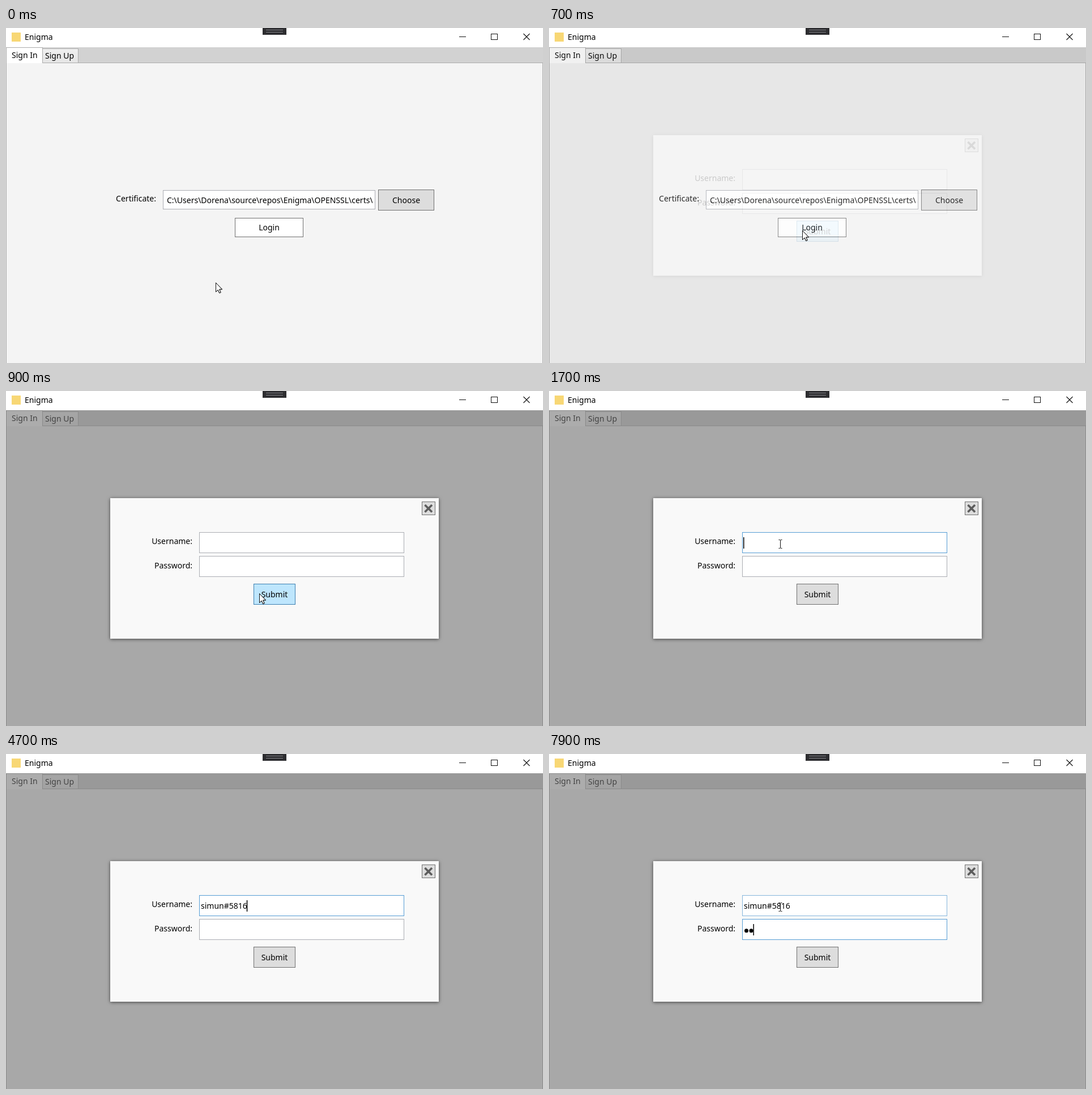
An HTML page with a canvas for the animation above (8 s loop, 948 by 591 pixels).

```html
<!DOCTYPE html>
<html lang="en">
<head>
<meta charset="utf-8">
<title>Enigma</title>
<style>
  html, body { margin: 0; width: 100%; height: 100%; overflow: hidden; background: #fff; }
  canvas { display: block; width: 948px; height: 591px; }
</style>
</head>
<body>
<canvas id="stage" width="948" height="591"></canvas>
<script>
const W = 948, H = 591, LOOP = 8000, STEP = 100;
const TITLE_BAR = 34;
const stage = document.getElementById('stage').getContext('2d');
const layer = Object.assign(document.createElement('canvas'), { width: W, height: H }).getContext('2d');

const GREY = '#abadb3', FOCUS = '#569dd5', HOVER = '#86b6dc';
const BUTTON = { fill: '#dddddd', line: '#707070' };
const BUTTON_HOVER = { fill: '#bee6fd', line: '#3c7fb1' };
const CERT_PATH = 'C:\\Users\\Dorena\\source\\repos\\Enigma\\OPENSSL\\certs\\client.crt';
const USER = 'simun#5816';
const USER_KEYS = [1900, 2200, 2500, 2900, 2900, 3000, 4100, 4500, 4600, 4700];
const DOT_KEYS = [7200, 7600];
const USER_FOCUS = 1600, PASS_FOCUS = 5400, BLINK = 530;

const clamp01 = v => Math.max(0, Math.min(1, v));
const progress = (t, a, b) => clamp01((t - a) / (b - a));
const ease = p => p * p * (3 - 2 * p);
const mix = (a, b, p) => a + (b - a) * p;
const typed = (keys, t) => keys.filter(k => k <= t).length;

function box(c, x, y, w, h, fill, line) {
  c.fillStyle = fill;
  c.fillRect(x, y, w, h);
  if (!line) return;
  c.strokeStyle = line;
  c.lineWidth = 1;
  c.strokeRect(x + .5, y + .5, w - 1, h - 1);
}

function text(c, str, x, y, size = 14, weight = 500, align = 'left') {
  c.font = `${weight} ${size}px "Noto Sans", "Open Sans", sans-serif`;
  c.textAlign = align;
  c.fillStyle = '#000';
  c.fillText(str, x, y);
}

function lines(c, color, width, ...segments) {
  c.strokeStyle = color;
  c.lineWidth = width;
  c.beginPath();
  for (const [x1, y1, x2, y2] of segments) {
    c.moveTo(x1, y1);
    c.lineTo(x2, y2);
  }
  c.stroke();
}

function button(c, label, x, y, w, h, style) {
  box(c, x, y, w, h, style.fill, style.line);
  text(c, label, x + w / 2, y + h / 2 + 5, 14, 500, 'center');
}

function drawTitleBar(c) {
  box(c, 0, 0, W, TITLE_BAR, '#fff');
  box(c, 10, 8, 16, 16, '#f8d775');
  text(c, 'Enigma', 33, 21, 14, 400);
  box(c, 453, 0, 42, 12, '#2d2d30');
  lines(c, '#85858a', 1, [459, 3.5, 489, 3.5], [459, 7.5, 489, 7.5]);
  lines(c, '#111', 1, [800, 15.5, 812, 15.5]);
  c.strokeRect(856.5, 10.5, 11, 10);
  lines(c, '#111', 1.1, [913.5, 10, 924.5, 21], [924.5, 10, 913.5, 21]);
}

function drawPage(c, t) {
  box(c, 0, TITLE_BAR, W, 28, '#d2d2d2');
  box(c, 0, 61, W, H - 60, '#f4f4f4', '#acacac');
  box(c, 0, 34, 65, 28, '#fff');
  lines(c, '#acacac', 1, [0, 34.5, 64, 34.5], [.5, 34, .5, 62], [64.5, 34, 64.5, 62]);
  const shade = c.createLinearGradient(0, 36, 0, 61);
  shade.addColorStop(0, '#f0f0f0');
  shade.addColorStop(1, '#e5e5e5');
  box(c, 64, 36, 64, 26, shade, '#acacac');
  text(c, 'Sign In', 10, 53);
  text(c, 'Sign Up', 69, 54);

  text(c, 'Certificate:', 265, 306, 14, 500, 'right');
  box(c, 277, 286, 375, 34, '#fff', GREY);
  c.save();
  c.beginPath();
  c.rect(280, 287, 367, 32);
  c.clip();
  text(c, CERT_PATH, 284, 309);
  c.restore();
  button(c, 'Choose', 657, 285, 99, 37, BUTTON);
  const hovered = t >= 300 && t < 500;
  button(c, 'Login', 404, 335, 121, 34, hovered ? BUTTON_HOVER : { fill: '#fff', line: '#707070' });
}

function panel(c, x, y, w, h, fill) {
  c.save();
  c.shadowColor = 'rgba(0,0,0,.6)';
  c.shadowBlur = 6;
  c.shadowOffsetY = 1;
  box(c, x, y, w, h, fill);
  c.restore();
}

// Dims the page and shows a panel, faded in as one group.
function overlay(alpha, dim, drawContent) {
  if (alpha <= 0) return;
  layer.clearRect(0, 0, W, H);
  box(layer, 0, TITLE_BAR, W, H - TITLE_BAR, `rgba(115,115,115,${dim})`);
  drawContent(layer);
  stage.globalAlpha = alpha;
  stage.drawImage(layer.canvas, 0, 0);
  stage.globalAlpha = 1;
}

function dot(c, x, y, r, color) {
  c.fillStyle = color;
  c.beginPath();
  c.arc(x, y, r, 0, 7);
  c.fill();
}

function drawLoader(c) {
  panel(c, 354, 253, 240, 120, '#f8fbff');
  dot(c, 474, 298.5, 5.3, '#6495ed');
  text(c, 'Checking certificate ...', 474, 339, 16.5, 500, 'center');
}

function caret(c, x, y, t, start, keys) {
  const last = Math.max(start, ...keys.filter(k => k <= t));
  if (Math.floor((t - last) / BLINK) % 2 === 0) box(c, x, y, 1.5, 20, '#000');
}

function drawLogin(c, t) {
  panel(c, 184, 189, 580, 248, '#f9f9f9');
  box(c, 734, 195, 24, 24, BUTTON.fill, BUTTON.line);
  lines(c, '#5c5c5c', 3.6, [739.5, 201, 752, 213.5], [752, 201, 739.5, 213.5]);

  text(c, 'Username:', 329, 270, 14, 500, 'right');
  text(c, 'Password:', 329, 313, 14, 500, 'right');
  const inUser = t >= USER_FOCUS && t < PASS_FOCUS;
  const hoverUser = t >= 1500;
  box(c, 341, 249, 362, 37, '#fff', inUser ? FOCUS : hoverUser ? HOVER : GREY);
  const inPass = t >= PASS_FOCUS;
  const hoverPass = t >= 1300 && t < 1500;
  box(c, 341, 291, 362, 37, '#fff', inPass ? FOCUS : hoverPass ? HOVER : GREY);

  const name = USER.slice(0, typed(USER_KEYS, t));
  text(c, name, 344, 273);
  if (inUser) caret(c, 343 + c.measureText(name).width, 258, t, USER_FOCUS, USER_KEYS);

  const dots = typed(DOT_KEYS, t);
  for (let i = 0; i < dots; i++) dot(c, 348.5 + i * 8.5, 311.7, 3.5, '#000');
  if (inPass) caret(c, 343 + dots * 8.7, 300, t, PASS_FOCUS, DOT_KEYS);

  button(c, 'Submit', 437, 340, 74, 37, t < 1100 ? BUTTON_HOVER : BUTTON);
}

function drawArrow(c, x, y) {
  c.save();
  c.translate(x + .5, y + .5);
  c.fillStyle = '#fff';
  c.strokeStyle = '#111';
  c.lineWidth = 1;
  c.stroke(arrow);
  c.fill(arrow);
  c.stroke(arrow);
  c.restore();
}
const arrow = new Path2D('M0 0V16L3.7 12.5L6.2 18L8.6 17L6.2 11.5H11Z');

function drawBeam(c, x, y) {
  lines(c, '#111', 1,
    [x, y - 6, x, y + 7],
    [x - 3, y - 7, x - 1, y - 7], [x + 1, y - 7, x + 3, y - 7],
    [x - 3, y + 8, x - 1, y + 8], [x + 1, y + 8, x + 3, y + 8],
    [x - 1, y - 6.5, x + 1, y - 6.5], [x - 1, y + 7.5, x + 1, y + 7.5]);
}

function drawPointer(c, t) {
  // The pointer hides while the user name is being typed.
  if (t >= USER_KEYS[0] && t < PASS_FOCUS) return;
  const toLogin = ease(progress(t, 0, 400)), toField = ease(progress(t, 900, 1600));
  const x = mix(mix(370, 447, toLogin), 408, toField);
  const y = mix(mix(449, 357, toLogin), 269, toField);
  if (t >= 1300) drawBeam(c, Math.round(x) + .5, Math.round(y) + .5);
  else drawArrow(c, Math.round(x), Math.round(y));
}

function render(now) {
  const t = Math.floor((now % LOOP) / STEP) * STEP;
  drawPage(stage, t);
  if (t < 700) overlay(progress(t, 450, 600), .45, drawLoader);
  overlay(progress(t, 660, 900), .59, c => drawLogin(c, t));
  drawTitleBar(stage);
  drawPointer(stage, t);
}

const start = performance.now();
function frame() {
  render(performance.now() - start);
  requestAnimationFrame(frame);
}
frame();
</script>
</body>
</html>
```
